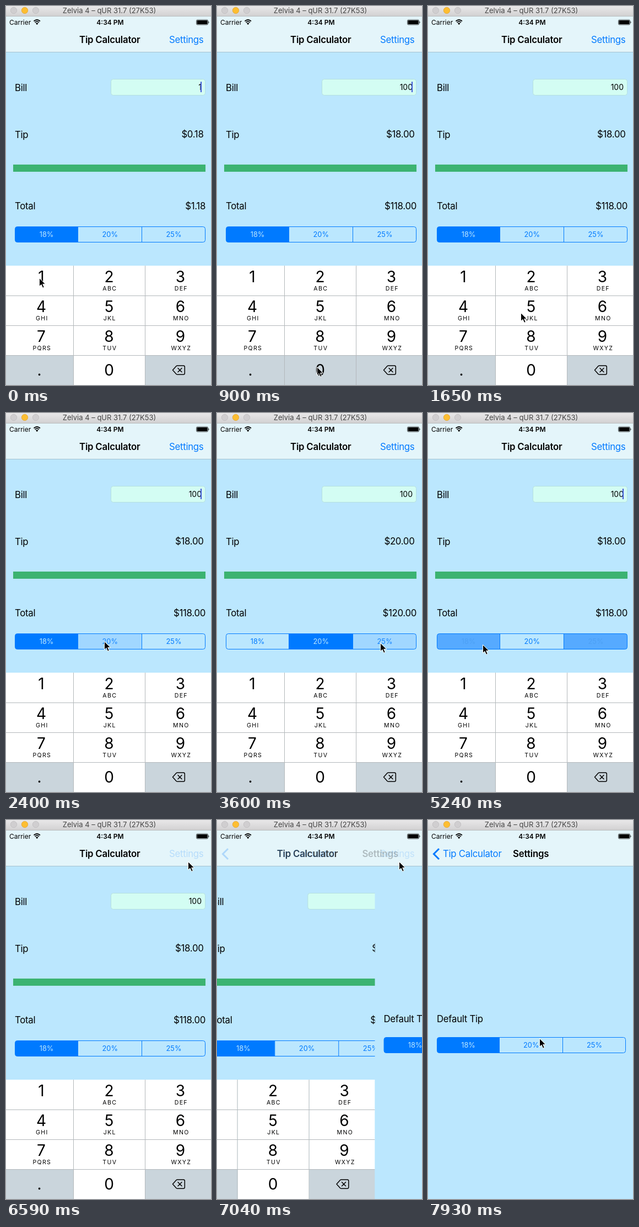
An HTML page for the animation above (8 s loop, 372 by 686 pixels).

```html
<!DOCTYPE html>
<html lang="en">
<head>
<meta charset="utf-8">
<title>Tip Calculator</title>
<style>
  html, body { margin: 0; width: 100%; height: 100%; overflow: hidden; background: #bbe7fe; }
  svg { display: block; width: 372px; height: 686px; }
  text { font: 16.8px Inter, "Liberation Sans", sans-serif; letter-spacing: -.28px; white-space: pre; }
  .end { text-anchor: end; }
  .mid { text-anchor: middle; }
  .bold { font-weight: 600; letter-spacing: -.2px; }
  .blue { fill: #007aff; }
  .status { font-size: 12px; letter-spacing: 0; }
  .window { font-size: 13px; letter-spacing: 0; fill: #454545; }
  .bill { font-size: 14px; letter-spacing: 0; }
  .seg { font-size: 12.8px; letter-spacing: 0; }
  .digit { font-size: 28px; letter-spacing: 0; }
  .letters { font-size: 10.6px; letter-spacing: 1.3px; }
  .line { fill: none; stroke: #000; stroke-width: 1.5; stroke-linejoin: round; stroke-linecap: round; }
</style>
</head>
<body>
<svg viewBox="0 0 372 686">
  <defs>
    <linearGradient id="chrome" x2="0" y2="1">
      <stop stop-color="#e9e8e9"/><stop offset="1" stop-color="#d2d1d2"/>
    </linearGradient>
  </defs>
  <rect width="372" height="686" fill="#bbe7fe"/>

  <g id="main">
    <text x="16" y="154">Bill</text>
    <rect x="190.5" y="132.5" width="171" height="29" rx="4" fill="#d3fdf3" stroke="#b4dfe0"/>
    <text id="bill" class="bill end" x="355" y="152"></text>
    <rect id="caret" x="353" y="137" width="2" height="19" fill="#4059d8"/>
    <text x="16" y="238.500">Tip</text>
    <text id="tip" class="end" x="358.500" y="238"></text>
    <rect x="13" y="287" width="349" height="13" fill="#3cb371"/>
    <text x="16" y="368">Total</text>
    <text id="total" class="end" x="362" y="368"></text>
    <g id="rates"></g>
  </g>

  <g id="keypad"></g>

  <g id="page">
    <rect y="83" width="372" height="603" fill="#bbe7fe"/>
    <text x="16" y="366">Default Tip</text>
    <g id="defaults"></g>
  </g>

  <rect y="18" width="372" height="65" fill="#e4f5fa"/>
  <rect y="83" width="372" height="1" fill="#a5c3d0"/>
  <text id="title" class="bold" x="133" y="67">Tip Calculator</text>
  <text id="link" class="blue" x="296" y="67">Settings</text>
  <path id="chevron" d="M20 52l-9.500 9.500l9.500 9.500" fill="none" stroke="#007aff" stroke-width="3"/>
  <text id="back" class="blue" x="27" y="67">Tip Calculator</text>
  <text id="heading" class="bold" x="154" y="67">Settings</text>

  <text class="status" x="6" y="33.500">Carrier</text>
  <g fill="none" stroke="#000" stroke-width="1.700">
    <path d="M50.500 27.500q5.700-5 11.400 0M52.500 29.800q3.700-3.200 7.400 0"/>
    <path d="M56.200 34l-2.300-2.600q2.300-1.800 4.600 0z" fill="#000" stroke="none"/>
  </g>
  <text class="status mid" style="font-weight:600" x="189" y="33.500">4:34 PM</text>
  <rect x="345.500" y="25" width="21" height="9" rx="2" fill="none" stroke="#000" stroke-width=".7"/>
  <rect x="346.500" y="26" width="19" height="7" rx="1" />
  <path d="M367.500 27.500q2 2 0 4z"/>

  <rect width="372" height="18" fill="url(#chrome)"/>
  <rect y="18" width="372" height="1" fill="#b9bcbd"/>
  <g stroke-width=".7">
    <circle cx="14" cy="8" r="5.700" fill="#d0ced0" stroke="#bbb9bb"/>
    <circle cx="34" cy="8" r="5.700" fill="#fdbe32" stroke="#dfa02a"/>
    <circle cx="54" cy="8" r="5.700" fill="#d0ced0" stroke="#bbb9bb"/>
  </g>
  <text class="window mid" x="187.500" y="13">Zelvia 4 – qUR 31.7 (27K53)</text>

  <path id="cursor" d="M0 0v15l3.500-3.200l2.700 6l2.600-1.100l-2.600-5.900h4.800z" stroke="#fff" stroke-width="1"/>
</svg>
<script>
const LOOP = 8000;
const $ = id => document.getElementById(id);

function add(parent, tag, attrs, label) {
  const el = document.createElementNS('http://www.w3.org/2000/svg', tag);
  for (const k in attrs) el.setAttribute(k, attrs[k]);
  if (label) el.textContent = label;
  return parent.appendChild(el);
}

// Segmented control; edges holds the left, both divider and right positions
const LOOKS = {
  off: ['#bbe7fe', '#007aff'],
  on: ['#007aff', '#bbe7fe'],
  press: ['#a1d7ff', '#1685ff'],
  fade: ['#56aaff', '#4da0f4']
};
function segments(group, edges, y) {
  const [left, , , right] = edges;
  const id = group.id + 'Clip';
  const frame = { x: left + .5, y: y + .5, width: right - left - 1, height: 28, rx: 4 };
  add(add(group, 'clipPath', { id }), 'rect', frame);
  const body = add(group, 'g', { 'clip-path': `url(#${id})` });
  const parts = ['18%', '20%', '25%'].map((label, i) => {
    const x = edges[i], w = edges[i + 1] - x;
    const rect = add(body, 'rect', { x, y, width: w, height: 29 });
    const text = add(group, 'text', { class: 'seg mid', x: x + w / 2 + .3, y: y + 19 }, label);
    return [rect, text];
  });
  for (const x of edges.slice(1, 3))
    add(group, 'rect', { x: x - .5, y, width: 1, height: 29, fill: '#007aff' });
  add(group, 'rect', { ...frame, fill: 'none', stroke: '#007aff' });
  return looks => looks.forEach((look, i) =>
    parts[i].forEach((el, j) => el.setAttribute('fill', LOOKS[look][j])));
}
const setRates = segments($('rates'), [16, 130.5, 246.5, 362], 399);
segments($('defaults'), [16, 129.5, 244.5, 359], 393)(['on', 'off', 'off']);

// Keypad
const GREY = '#cad5dc';
const pad = $('keypad'), cols = [0, 123, 253, 372], centers = [64, 187, 316.5];
const letters = ['', 'ABC', 'DEF', 'GHI', 'JKL', 'MNO', 'PQRS', 'TUV', 'WXYZ'];
const keys = [...'123456789.0', ''].map((digit, i) => {
  const c = i % 3, y = 470 + 54 * Math.floor(i / 3);
  const side = i === 9 || i === 11;
  const rect = add(pad, 'rect', { x: cols[c], y, width: cols[c + 1] - cols[c], height: 54.5, fill: side ? GREY : '#fff' });
  const x = i === 9 ? 60.5 : centers[c];
  add(pad, 'text', { class: 'digit mid', x, y: y + (i > 8 ? 37 : 30) }, digit);
  if (letters[i]) add(pad, 'text', { class: 'letters mid', x: x + 1.3, y: y + 45 }, letters[i]);
  return rect;
});
for (const x of [122, 252]) add(pad, 'rect', { x, y: 470, width: 1, height: 216, fill: '#b3b8bb' });
for (const y of [524, 578, 632]) add(pad, 'rect', { x: 0, y, width: 372, height: 1, fill: '#b3b8bb' });
add(pad, 'path', { class: 'line', d: 'M302.500 659l6.500-7.200q.8-.8 2-.8h11q2.300 0 2.300 2.300v11.400q0 2.300-2.300 2.300h-11q-1.200 0-2-.8zM312 655.500l7 7m0-7l-7 7' });

// Pointer track: time, x, y
const track = [
  [0, 60, 492], [150, 72, 516], [300, 135, 605], [450, 178, 650], [600, 181, 653],
  [1350, 181, 653], [1500, 178, 635], [1650, 168, 555], [1800, 167, 470], [1950, 174, 422], [2100, 178, 413],
  [2850, 178, 413], [3000, 188, 418], [3300, 262, 420], [3450, 294, 417], [3600, 296, 416],
  [4350, 296, 416], [4500, 284, 421], [4650, 230, 425], [4800, 155, 424], [4950, 104, 420], [5090, 99, 419],
  [5540, 99, 419], [5690, 105, 410], [5840, 133, 361], [5990, 190, 280], [6140, 258, 187], [6290, 314, 104], [6440, 330, 75],
  [7040, 330, 75], [7190, 326, 86], [7340, 234, 188], [7490, 174, 289], [7640, 169, 357], [7780, 194, 390], [7930, 202, 395]
];
function pointer(t) {
  const i = track.findIndex(p => p[0] >= t);
  if (i < 1) return track.at(i);
  const a = track[i - 1], b = track[i], k = (t - a[0]) / (b[0] - a[0]);
  return a.map((v, j) => v + (b[j] - v) * k);
}

function hold(t) {
  if (t < 5090) return Math.min(4950, Math.floor(t / 150) * 150);
  if (t >= 7780) return t < 7930 ? 7780 : 7930;
  return 5090 + Math.floor((t - 5090) / 150) * 150;
}

// Taps on the rate control: time, old and new segment
const taps = [[2400, 0, 1], [3600, 1, 2], [5090, 2, 0]];
function rates(t) {
  const looks = ['off', 'off', 'off'];
  const tap = taps.findLast(p => t >= p[0]);
  if (!tap) { looks[0] = 'on'; return [looks, 0]; }
  const [start, from, to] = tap, age = t - start;
  if (age < 140) { looks[from] = 'on'; looks[to] = 'press'; return [looks, from]; }
  if (age < 290) looks[from] = looks[to] = 'fade';
  else looks[to] = 'on';
  return [looks, to];
}

const slide = (id, x, y = 0) => $(id).setAttribute('transform', `translate(${x} ${y})`);
const show = (id, o) => $(id).setAttribute('opacity', o);
const money = v => '$' + v.toFixed(2);

function draw(time) {
  const t = hold(time);
  const bill = t < 600 ? 1 : t < 900 ? 10 : 100;
  const [looks, pick] = rates(t);
  const tip = bill * [.18, .2, .25][pick];
  $('bill').textContent = bill;
  $('tip').textContent = money(tip);
  $('total').textContent = money(bill + tip);
  setRates(looks);
  show('caret', t < 1000 || Math.floor(t / 500) % 2 === 0 ? 1 : 0);
  keys[10].setAttribute('fill', t === 600 || t === 900 ? GREY : '#fff');

  // Push to the settings page
  const k = Math.min(1, Math.max(0, (t - 7000) / 480));
  const p = 1 - (1 - k) ** 3;
  slide('main', -112 * p);
  slide('keypad', -372 * p);
  slide('page', 372 * (1 - p));
  slide('title', -106 * p);
  slide('back', 106 * (1 - p));
  slide('heading', 142 * (1 - p));
  show('title', 1 - p);
  for (const id of ['back', 'heading', 'chevron']) show(id, p);
  show('link', t < 6590 ? 1 : .2 * (1 - p));

  const [, x, y] = pointer(t);
  slide('cursor', x + .5, y + .5);
}

function tick(now) {
  draw(now % LOOP);
  requestAnimationFrame(tick);
}
draw(0);
requestAnimationFrame(tick);
</script>
</body>
</html>
```
